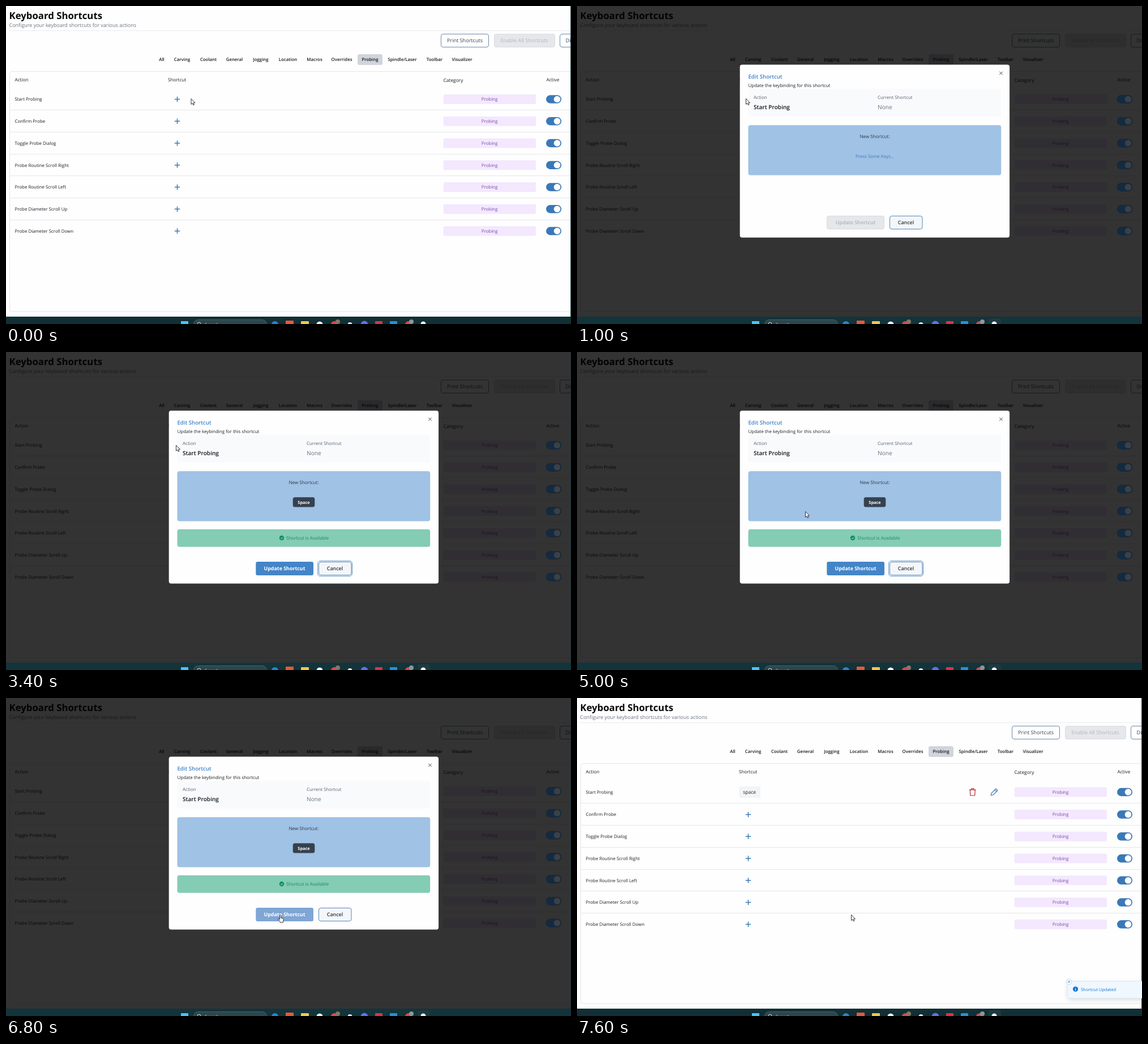
Recreate the animation shown at these times as an HTML page with a canvas. Size 998 by 561 pixels, loop 8000 ms.

```html
<!DOCTYPE html>
<html lang="en">
<head>
<meta charset="utf-8">
<title>Keyboard Shortcuts</title>
<style>
  html, body { margin: 0; width: 100%; height: 100%; overflow: hidden; background: #fff; }
  canvas { display: block; }
</style>
</head>
<body>
<canvas id="stage" width="998" height="561"></canvas>
<script>
const ctx = document.getElementById('stage').getContext('2d');
const LOOP = 8000, STEP = 200;
const OPEN = 1000, KEY_PRESS = 3200, CLICK = 6600, CLOSE = 7000, TOAST = 7200;
const BLUE = '#3b78b8', GREY = '#6b7280', INK = '#1c1f24';

const tabs = [['All', 275], ['Carving', 311], ['Coolant', 357.5], ['General', 403.5], ['Jogging', 450],
  ['Location', 498], ['Macros', 545], ['Overrides', 593], ['Probing', 643], ['Spindle/Laser', 700],
  ['Toolbar', 757], ['Visualizer', 805.5]];
const actions = ['Start Probing', 'Confirm Probe', 'Toggle Probe Dialog', 'Probe Routine Scroll Right',
  'Probe Routine Scroll Left', 'Probe Diameter Scroll Up', 'Probe Diameter Scroll Down'];
// Pointer stops: time, x, y
const pointerPath = [[0, 327, 163.5], [200, 327, 163.5], [800, 299.5, 164.5], [1000, 298.5, 163.5],
  [2200, 298.5, 163.5], [2600, 300.5, 164.5], [3800, 300.5, 164.5], [5000, 403.5, 281.5],
  [5100, 403.5, 281.5], [6200, 484.5, 382.5], [8000, 484.5, 382.5]];

// Text centred vertically on y
function text(str, x, y, size, color, weight = 400, align = 'left') {
  ctx.font = `${weight} ${size}px "Open Sans", "Noto Sans", sans-serif`;
  ctx.textAlign = align;
  ctx.fillStyle = color;
  ctx.fillText(str, x, y + size * 0.36);
}
const label = (str, x, y, size, color, weight) => text(str, x, y, size, color, weight, 'center');

function box(x, y, w, h, r, fill, stroke) {
  ctx.beginPath();
  ctx.roundRect(x, y, w, h, r);
  if (fill) { ctx.fillStyle = fill; ctx.fill(); }
  if (stroke) { ctx.strokeStyle = stroke; ctx.lineWidth = 1; ctx.stroke(); }
}
function disc(x, y, r, fill, stroke) { box(x - r, y - r, 2 * r, 2 * r, r, fill, stroke); }

function line(color, width, ...pts) {
  ctx.beginPath();
  for (let i = 0; i < pts.length; i += 2) ctx.lineTo(pts[i], pts[i + 1]);
  ctx.strokeStyle = color;
  ctx.lineWidth = width;
  ctx.stroke();
}
function cross(x, y, r, color, width) {
  line(color, width, x - r, y - r, x + r, y + r);
  line(color, width, x - r, y + r, x + r, y - r);
}
function plus(x, y) {
  line(BLUE, 1.5, x - 4.7, y, x + 4.7, y);
  line(BLUE, 1.5, x, y - 4.7, x, y + 4.7);
}

function pointerAt(t) {
  const i = Math.max(1, pointerPath.findIndex(p => p[0] > t));
  const [t0, x0, y0] = pointerPath[i - 1], [t1, x1, y1] = pointerPath[i];
  const u = (t - t0) / (t1 - t0), e = u * u * (3 - 2 * u);
  return { x: x0 + (x1 - x0) * e, y: y0 + (y1 - y0) * e };
}

function rowY(i, bound) {
  return 164.5 + 38.75 * i + (bound ? (i ? 2.3 : 1.5) : 0);
}

function drawToggle(y, dim) {
  box(954, y - 7.2, 27, 14.4, 7.2, dim ? '#142a40' : BLUE);
  disc(973.5, y, 5.8, dim ? '#3b4045' : '#fff');
}

function drawPage(bound, hoverPlus) {
  ctx.fillStyle = '#fefefe';
  ctx.fillRect(0, 0, 998, 561);
  text('Keyboard Shortcuts', 5.5, 16.5, 16.8, '#0a0a0a', 700);
  text('Configure your keyboard shortcuts for various actions', 5.5, 33.5, 8.97, GREY);
  line('#e8eaed', 1, 6, 43.5, 997, 43.5);

  box(768.5, 49.5, 84, 23, 3.5, '#fff', '#7188ad');
  label('Print Shortcuts', 810.5, 61, 9.1, '#3c4350', 500);
  box(862.5, 49.5, 107, 23, 3.5, '#e5e7eb', '#d9dce1');
  label('Enable All Shortcuts', 915.5, 61, 9.1, '#b1b5bc', 500);
  box(978.5, 49.5, 120, 23, 3.5, '#fff', '#7188ad');
  text('Disable All Shortcuts', 988.5, 61, 9.1, '#3c4350', 500);

  box(621, 85, 44, 19, 3, '#d1d5db');
  for (const [name, x] of tabs) label(name, x, 94.5, 7.8, '#15181d', 600);

  box(6.5, 115.5, 1010, 423.5, 4, null, '#e3e5e9');
  text('Action', 15.5, 130.5, 8.2, INK, 500);
  text('Shortcut', 286, 130.5, 8.1, INK, 500);
  text('Category', 772.5, 130.5, 8.4, INK, 500);
  text('Active', 954.5, 130.5, 8.2, INK, 500);

  if (hoverPlus) box(286, 155, 32, 18, 3, '#eff4fd');
  actions.forEach((name, i) => {
    const y = rowY(i, bound);
    text(name, 15.5, y, 7.9, INK);
    if (!bound || i) plus(302.5, y);
    box(772.5, y - 8.5, 163.5, 17, 2.5, '#f3e8fe');
    label('Probing', 854, y, 7.9, '#7e46a8');
    drawToggle(y);
    if (i < 6) {
      const edge = Math.round(y + 18.6) + 0.5;
      line('#e5e7eb', 1, 7, edge, 997, edge);
    }
  });
  if (bound) drawBoundRow(rowY(0, true));
}

function drawBoundRow(y) {
  box(286, y - 10, 38, 20, 3, '#f3f4f6');
  label('space', 304.7, y - 0.5, 8.5, INK);
  const red = '#b8262c';
  line(red, 1.2, 693, y - 4, 704.5, y - 4);
  line(red, 1.2, 696.5, y - 4, 696.5, y - 6.2, 701, y - 6.2, 701, y - 4);
  line(red, 1.2, 694.3, y - 4, 694.8, y + 6, 702.7, y + 6, 703.2, y - 4);
  line(BLUE, 1.1, 731, y + 6, 732, y + 2, 740, y - 6, 743, y - 3, 735, y + 5, 731, y + 6);
  line(BLUE, 1.1, 738, y - 4, 741, y - 1);
}

function drawTaskbar(dim, active) {
  ctx.fillStyle = dim ? '#12343b' : '#112f35';
  ctx.fillRect(0, 548, 998, 13);
  if (active) box(727, 551, 22, 14, 3, '#1e3a40');
  box(331.5, 553.5, 129, 20, 8, '#2b464c', '#496167');
  ctx.beginPath();
  ctx.arc(341, 561, 3, 0, 7);
  ctx.strokeStyle = '#d5dcdd';
  ctx.stroke();
  text('Search', 351, 562, 8, '#c2cdcf');
  box(309, 556, 13, 12, 0, '#4cc2f5');
  box(494, 555, 14, 12, 1, '#e9573a');
  box(521, 556, 14, 12, 1, '#f3c64a');
  box(652, 556, 13, 12, 1, '#e0333e');
  box(678, 556, 13, 12, 1, '#2392d8');
  disc(475, 562, 6, '#2b84c9');
  disc(554, 562, 5.5, '#f1f3f4');
  disc(580, 562, 6, '#dc4a3d');
  disc(586, 557, 4, '#8b7465');
  disc(607.5, 562, 4, '#e2e6e8');
  disc(633, 562, 6.5, '#6370e6');
  disc(711, 562, 6, '#dc4a3d');
  disc(716, 557, 4, '#8b979b');
  disc(737, 561, 4.5, '#edf1f2');
}

function drawDialog(t, hover) {
  const pressed = t >= KEY_PRESS;
  box(287.7, 103.6, 476.4, 304.8, 4, '#fefefe');
  text('Edit Shortcut', 302.5, 124.5, 9.6, '#3f82c9', 600);
  text('Update the keybinding for this shortcut', 302.5, 140.5, 7.95, INK);
  cross(749, 118.5, 2.8, '#444', 1);
  box(302.5, 146.5, 446.5, 48.5, 3, '#f9fafc');
  text('Action', 312, 161.5, 8.1, '#59616d', 500);
  text('Start Probing', 312, 178.5, 10.1, '#111419', 600);
  text('Current Shortcut', 531, 161.5, 7.9, '#59616d', 500);
  text('None', 531, 178.5, 10.2, GREY, 500);

  box(302.5, 210.2, 446.7, 88.3, 4, '#9fc2e5');
  label('New Shortcut:', 526, 230.5, 8.1, '#2c3644', 500);
  if (pressed) {
    box(506.7, 256.3, 38.6, 17.2, 3.5, '#36414f');
    label('Space', 526, 265, 7.4, '#fff', 700);
    box(302.5, 312.7, 446.7, 31, 4, '#84ccb4');
    disc(487, 328, 4.2, '#0b8f66');
    line('#84ccb4', 1.1, 485, 328.2, 486.5, 329.6, 489.1, 326.6);
    text('Shortcut is Available', 495, 328, 8, '#168a66');
  } else {
    ctx.globalAlpha = 0.8 + 0.2 * Math.cos((t - OPEN) / 2000 * 2 * Math.PI);
    label('Press Some Keys...', 526, 265, 7.9, '#3f7bbf');
    ctx.globalAlpha = 1;
  }

  if (pressed) box(441.3, 370, 101.7, 24, 3, hover ? '#7fa6d5' : '#4385c8');
  else box(441.5, 370.5, 101, 23, 3, '#e5e7eb', '#d5d9df');
  label('Update Shortcut', 492, 382, 8.9, pressed ? '#fff' : '#adb2ba', pressed ? 700 : 600);
  if (pressed && t < CLICK) box(550.5, 368.5, 61, 27, 4.5, '#fff', '#6f97c0');
  box(552.5, 370.5, 57.5, 23, 3.5, '#f4f6f8', '#5288bb');
  label('Cancel', 581, 382, 8.9, '#2a323d', 600);
}

function drawToast(t) {
  const slide = t < TOAST + STEP ? 60 : 0;
  ctx.save();
  ctx.translate(slide, 0);
  ctx.shadowColor = 'rgba(0,0,0,.14)';
  ctx.shadowBlur = 8;
  ctx.shadowOffsetY = 3;
  box(866.5, 499.5, 150, 30, 4, '#eff8ff');
  ctx.shadowColor = 'transparent';
  box(866.5, 499.5, 150, 30, 4, null, '#d9eafa');
  disc(869, 500.5, 5, '#f2f9ff', '#c5dcf3');
  cross(869, 500.5, 1.7, '#2878c4', 0.9);
  disc(880.5, 513.5, 4.6, '#1273cf');
  line('#fff', 1.2, 880.5, 513, 880.5, 516.2);
  line('#fff', 1.2, 880.5, 510.8, 880.5, 512);
  text('Shortcut Updated', 890, 514, 7.5, '#1b73c8', 500);
  ctx.restore();
}

function drawPointer({ x, y }, hand) {
  const shape = hand
    ? 'M-1 1Q0-1 1.2 1V5.5L4.5 6.3Q6 6.8 5.8 8.5L5 11.5V13.5H-.5V12L-3.8 8.2Q-4.2 6.6-2.6 7L-1 8.3Z'
    : 'M0 0V10L2.3 7.9 3.8 11.3 5.4 10.6 4 7.3H7Z';
  const path = new Path2D(shape);
  ctx.save();
  ctx.translate(x, y);
  ctx.fillStyle = '#fff';
  ctx.fill(path);
  ctx.strokeStyle = '#222';
  ctx.lineWidth = 0.9;
  ctx.stroke(path);
  ctx.restore();
}

function render(t) {
  const pointer = pointerAt(t);
  const dialog = t >= OPEN && t < CLOSE;
  const bound = t >= CLOSE;
  const overPlus = t < OPEN && pointer.x < 318;
  const overUpdate = dialog && pointer.y > 370;

  drawPage(bound, overPlus);
  if (dialog) {
    ctx.fillStyle = 'rgba(0,0,0,.8)';
    ctx.fillRect(0, 0, 998, 548);
    actions.forEach((_, i) => drawToggle(rowY(i, false), true));
  }
  ctx.fillStyle = '#24383d';
  ctx.fillRect(997, 0, 1, 548);
  drawTaskbar(dialog, t >= 600);
  if (dialog) drawDialog(t, overUpdate);
  if (t >= TOAST) drawToast(t);
  drawPointer(pointer, overPlus || overUpdate);
}

ctx.textRendering = 'geometricPrecision';
ctx.lineJoin = 'round';
const start = performance.now();
function tick() {
  const t = (performance.now() - start) % LOOP;
  render(Math.floor(t / STEP) * STEP);
  requestAnimationFrame(tick);
}
tick();
</script>
</body>
</html>
```
